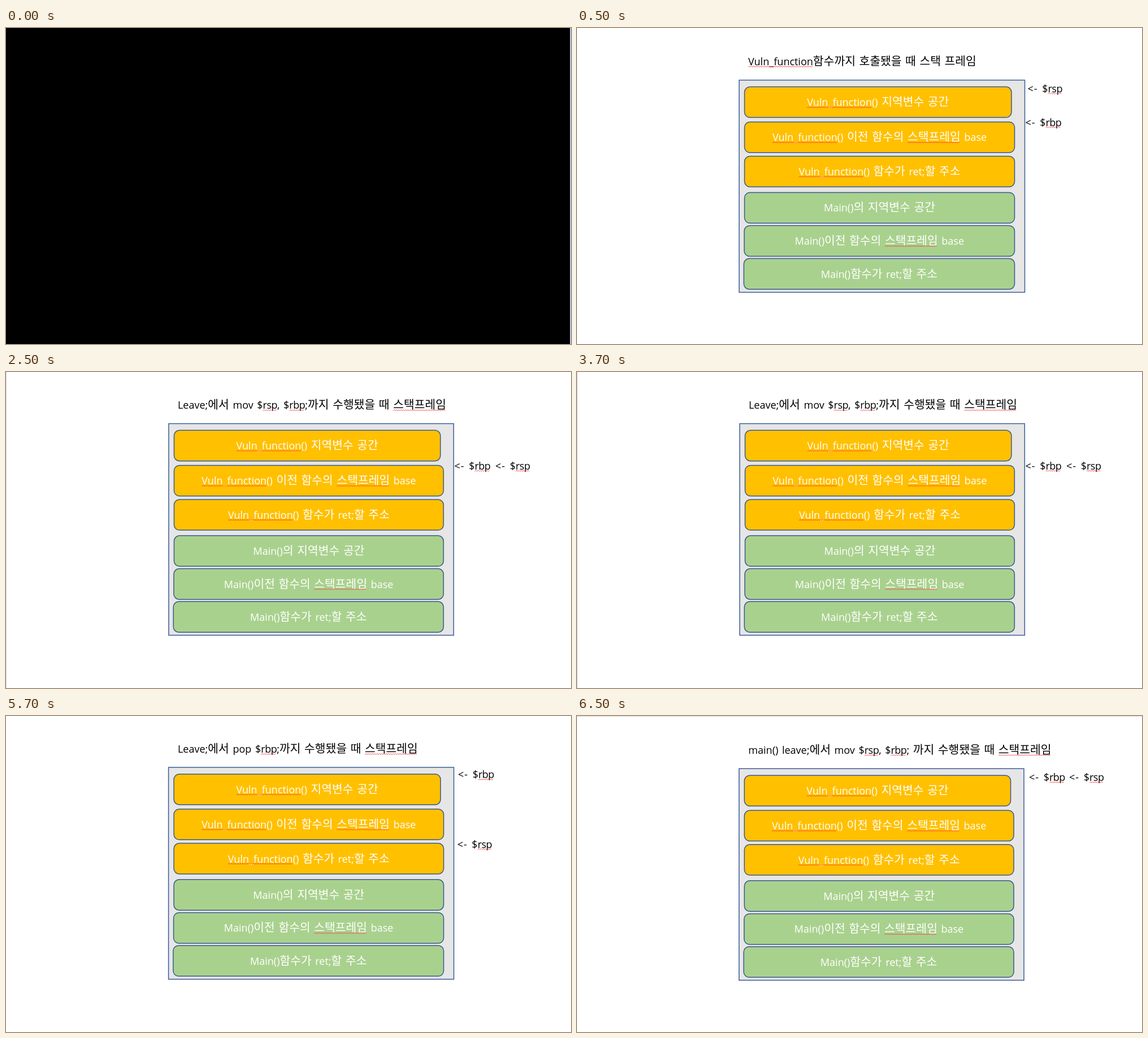
Recreate the animation shown at these times as an HTML page. Size 1000x560 px, loop 8 s.

```html
<!DOCTYPE html>
<html lang="ko">
<head>
<meta charset="utf-8">
<title>Stack frame</title>
<style>
  html, body { margin: 0; width: 100%; height: 100%; overflow: hidden; background: #fff; }
  svg { display: block; width: 1000px; height: 560px; }
  text { white-space: pre; word-spacing: 1.9px; font: 18px "Open Sans", "Noto Sans", sans-serif; }
  .ko { font: 20.4px "Noto Sans CJK KR DemiLight", "Noto Sans CJK KR", "Noto Sans CJK", sans-serif; }
  .reg { letter-spacing: -.5px; }
  .arrow { letter-spacing: 1px; }
  .wave { fill: none; stroke: #f33; stroke-width: 1; opacity: .85; }
  .box { stroke: #39598f; stroke-width: 1.5; }
</style>
</head>
<body>
<svg id="stage" viewBox="0 0 1000 560"></svg>
<script>
const NS = 'http://www.w3.org/2000/svg';
const stage = document.getElementById('stage');
const LOOP = 8000;
const ORANGE = '#ffc000', GREEN = '#a9d18e';
const BASE = { x: 287, y: 92.4, w: 505.5, h: 376 };

// left, top, right, fill, label; [word] gets a wavy underline
const ROWS = [
  [296.5, 104.3, 769, ORANGE, '[Vuln_function]() 지역변수 공간'],
  [296.5, 166.5, 774.5, ORANGE, '[Vuln_function]() 이전 함수의 [스택프레임] base'],
  [296.5, 227.2, 774.5, ORANGE, '[Vuln_function]() 함수가 ret;할 주소'],
  [296.5, 291.5, 774.5, GREEN, 'Main()의 지역변수 공간'],
  [296, 350.2, 774.5, GREEN, 'Main()이전 함수의 [스택프레임] base'],
  [295.3, 408.6, 774.5, GREEN, 'Main()함수가 ret;할 주소']
];

// frame: x, y, w, h; lines: x, baseline, text
const SCENES = [
  { at: 0, blank: true },
  { at: 500, frame: [287, 92.4, 505.5, 376], lines: [
    [303, 66, '[Vuln_function]함수까지 호출됐을 때 스택 프레임'],
    [797.5, 113.5, '<- $[rsp]'],
    [793.5, 173.5, '<- $[rbp]']] },
  { at: 2500, frame: [288, 91.5, 504.3, 375], edge: [0, 0, 1, 560], lines: [
    [304, 65.3, 'Leave;에서 mov $[rsp], $[rbp];까지 수행됐을 때 [스택프레임]'],
    [793.5, 172.7, '<- $[rbp]'],
    [866, 172.7, '<- $[rsp]']] },
  { at: 4500, frame: [287.6, 91, 505, 375.5], lines: [
    [304, 65, 'Leave;에서 pop $[rbp];까지 수행됐을 때 [스택프레임]'],
    [800, 110, '<- $[rbp]'],
    [798.7, 233.5, '<- $[rsp]']] },
  { at: 6500, frame: [286.8, 93.3, 504.2, 375], edge: [0, 0, 1000, 1], lines: [
    [303.3, 67, 'main() leave;에서 mov $[rsp], $[rbp]; 까지 수행됐을 때 [스택프레임]'],
    [800, 115, '<- $[rbp]'],
    [871, 115, '<- $[rsp]']] }
];

function add(parent, tag, attrs) {
  const el = parent.appendChild(document.createElementNS(NS, tag));
  for (const key in attrs) el.setAttribute(key, attrs[key]);
  return el;
}

function rect(parent, x, y, width, height, fill, more) {
  return add(parent, 'rect', { x, y, width, height, fill, ...more });
}

function wave(parent, x0, x1, y) {
  let d = `M${x0} ${y}`;
  for (let x = x0 + 2, up = true; x <= x1; x += 2, up = !up) d += `L${x} ${up ? y - 1.5 : y}`;
  add(parent, 'path', { d, class: 'wave' });
}

function write(parent, x, y, str, fill, anchor = 'start') {
  const text = add(parent, 'text', { x, y, fill, 'text-anchor': anchor });
  const marks = [];
  let pos = 0;
  for (const part of str.match(/\[[^\]]+\]|<- |[가-힣]+|[^[<가-힣]+/g)) {
    const word = part.replace(/[[\]]/g, '');
    const kind = /[가-힣]/.test(word) ? 'ko' : word === '<- ' ? 'arrow' : /^r.p$/.test(word) ? 'reg' : 'en';
    add(text, 'tspan', { class: kind }).textContent = word;
    if (part !== word) marks.push([pos, pos + word.length - 1]);
    pos += word.length;
  }
  for (const [a, b] of marks)
    wave(parent, text.getStartPositionOfChar(a).x, text.getEndPositionOfChar(b).x, y + 3.2);
}

function build(scene) {
  const g = add(stage, 'g', {});
  if (scene.blank) {
    rect(g, 0, 0, 998, 560, '#000');
    rect(g, 998, 0, 1, 560, '#6f8fc8');
    rect(g, 999, 0, 1, 560, '#e9eef8');
    return g;
  }
  rect(g, 0, 0, 1000, 560, '#fff');
  if (scene.edge) rect(g, ...scene.edge, '#d4d4d4');
  const [fx, fy, fw, fh] = scene.frame;
  const mapX = x => fx + (x - BASE.x) * fw / BASE.w;
  const mapY = y => fy + (y - BASE.y) * fh / BASE.h;
  rect(g, fx, fy, fw, fh, '#e7e6e6', { stroke: '#3a5c9d', 'stroke-width': 1.5 });
  for (const [l, t, r, fill, label] of ROWS) {
    const x = mapX(l), y = mapY(t), w = mapX(r) - x;
    rect(g, x, y, w, 54.3, fill, { rx: 9.5, class: 'box' });
    write(g, x + w / 2, y + 33.9, label, '#fff', 'middle');
  }
  for (const [x, y, str] of scene.lines) write(g, x, y, str, '#000');
  return g;
}

const groups = SCENES.map(build);
const start = performance.now();

function draw() {
  const t = (performance.now() - start) % LOOP;
  const now = SCENES.findLastIndex(s => t >= s.at);
  groups.forEach((g, i) => g.setAttribute('visibility', i === now ? 'visible' : 'hidden'));
  requestAnimationFrame(draw);
}
draw();
</script>
</body>
</html>
```
